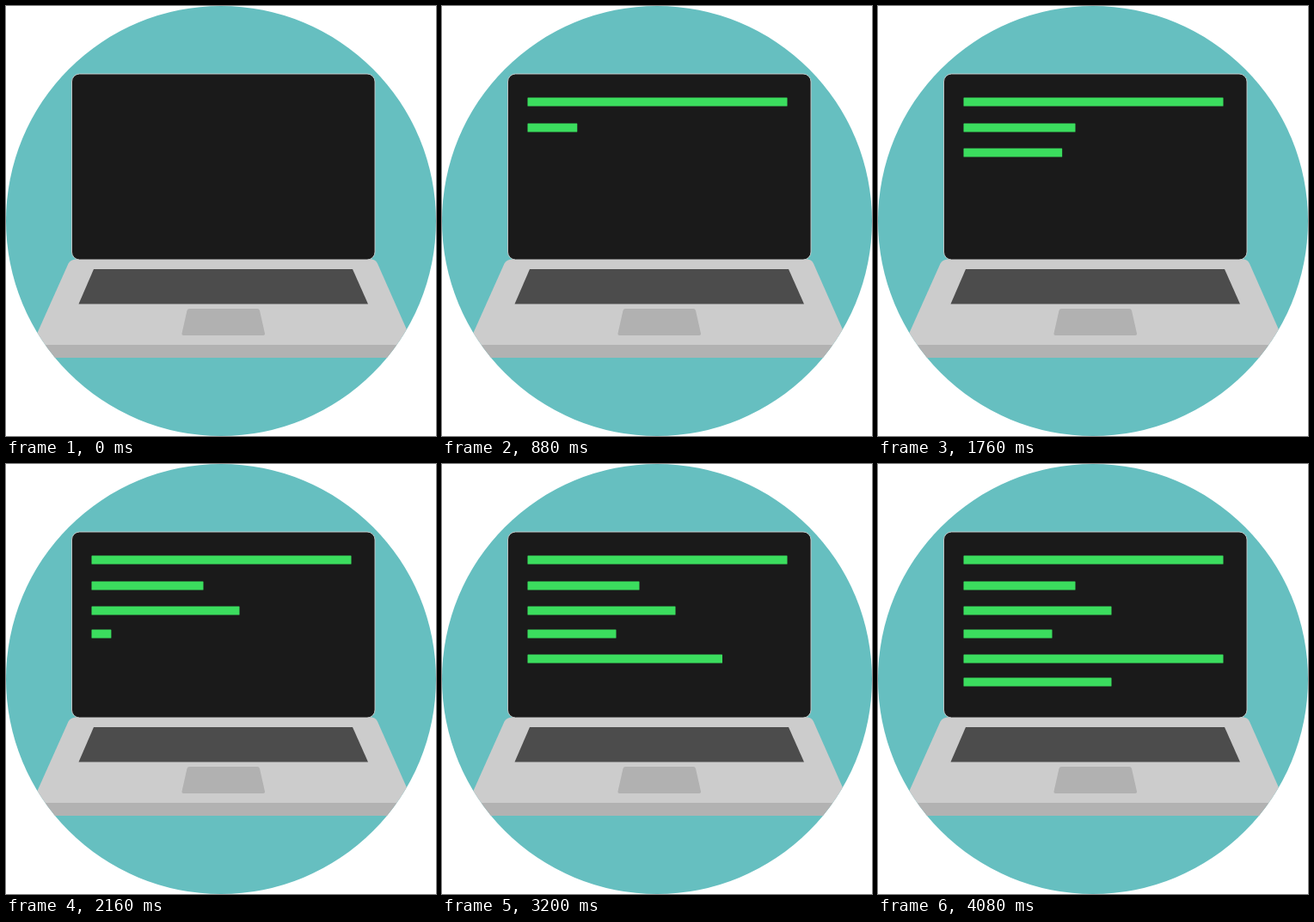
Recreate the animation shown at these times as an HTML page with a canvas. Size 500 by 500 pixels, loop 4.56 s.

```html
<!DOCTYPE html>
<html lang="en">
<head>
<meta charset="utf-8">
<title>Laptop typing</title>
<style>
  html, body { margin: 0; width: 100%; height: 100%; overflow: hidden; background: #fff; }
  canvas { display: block; width: 100vw; height: 100vh; }
</style>
</head>
<body>
<canvas id="stage" width="500" height="500"></canvas>
<script>
const ctx = document.getElementById('stage').getContext('2d');
const STEP = 80;
const LOOP = 4560;
const LEFT = 99.5;
const BAR = 10;

// Each line types at a constant rate; start and end are in steps.
const lines = [
  { y: 106.5, width: 302, start: 0, end: 7 },
  { y: 136.5, width: 130, start: 7, end: 16 },
  { y: 165.5, width: 172, start: 16, end: 25 },
  { y: 192.5, width: 103, start: 25, end: 34 },
  { y: 221.5, width: 302, start: 34, end: 42 },
  { y: 248.5, width: 172, start: 42, end: 51 }
];

function polygon(color, points) {
  ctx.fillStyle = color;
  ctx.beginPath();
  points.forEach(([x, y]) => ctx.lineTo(x, y));
  ctx.closePath();
  ctx.fill();
}

function roundRect(x, y, w, h, r) {
  ctx.beginPath();
  ctx.roundRect(x, y, w, h, r);
}

function drawBase() {
  ctx.fillStyle = '#cccccc';
  ctx.beginPath();
  ctx.moveTo(81, 294.5);
  ctx.lineTo(425, 294.5);
  ctx.quadraticCurveTo(430, 295, 432, 299.5);
  ctx.lineTo(474, 394.5);
  ctx.lineTo(30, 394.5);
  ctx.lineTo(72.5, 299.5);
  ctx.quadraticCurveTo(75, 295, 81, 294.5);
  ctx.fill();

  ctx.fillStyle = '#b2b2b2';
  ctx.fillRect(30, 394, 444, 15);

  polygon('#4c4c4c', [[102, 306], [403, 306], [421, 346.5], [84.5, 346.5]]);

  // Touchpad with softened corners
  ctx.fillStyle = '#b1b1b1';
  ctx.beginPath();
  ctx.moveTo(250, 352);
  ctx.arcTo(294.5, 352, 301.5, 383, 3);
  ctx.arcTo(301.5, 383, 250, 383, 2);
  ctx.arcTo(204, 383, 211, 352, 2);
  ctx.arcTo(211, 352, 250, 352, 3);
  ctx.closePath();
  ctx.fill();
}

function drawScreen() {
  roundRect(76.5, 79, 352.5, 216, 9);
  ctx.fillStyle = '#1a1a1a';
  ctx.fill();
  ctx.strokeStyle = '#cccccc';
  ctx.lineWidth = 0.9;
  ctx.stroke();
}

function drawLines(step) {
  ctx.fillStyle = '#3bdd5e';
  for (const { y, width, start, end } of lines) {
    const progress = Math.min(1, (step - start) / (end - start));
    if (progress <= 0) continue;
    roundRect(LEFT, y, width * progress, BAR, 0.5);
    ctx.fill();
  }
}

function draw(time) {
  const step = Math.min(51, Math.floor((time % LOOP) / STEP));
  ctx.fillStyle = '#ffffff';
  ctx.fillRect(0, 0, 500, 500);
  ctx.save();
  ctx.beginPath();
  ctx.arc(250, 250, 250, 0, Math.PI * 2);
  ctx.clip();
  ctx.fillStyle = '#66bfc0';
  ctx.fillRect(0, 0, 500, 500);
  drawBase();
  drawScreen();
  drawLines(step);
  ctx.restore();
}

const begin = performance.now();
function tick() {
  draw(Math.max(0, performance.now() - begin));
  requestAnimationFrame(tick);
}
tick();
</script>
</body>
</html>
```
